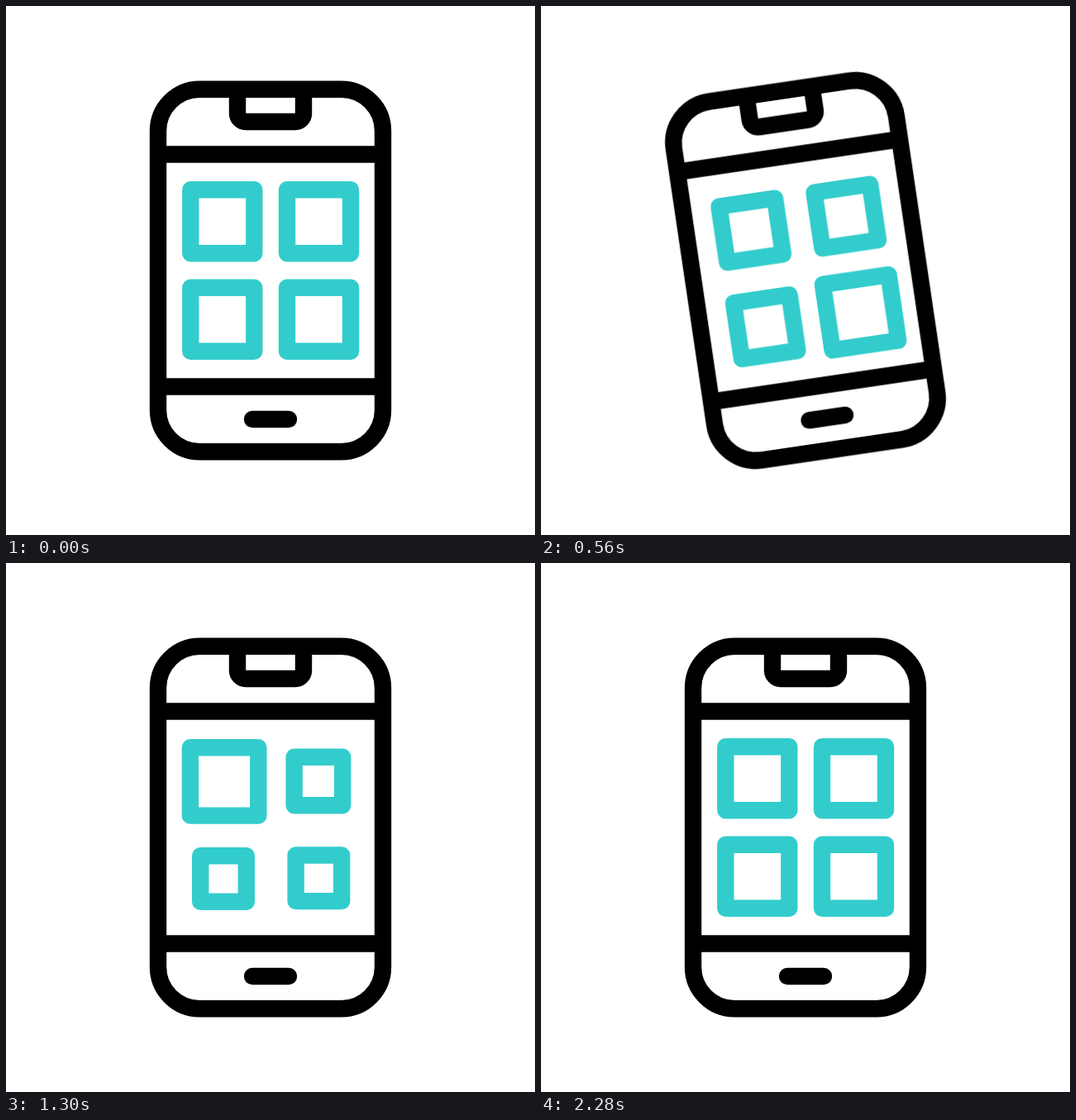
Recreate the animation shown at these times as an HTML page. Size 640x640 px, loop 2400 ms.

```html
<!DOCTYPE html>
<html lang="en">
<head>
<meta charset="utf-8">
<title>Phone apps</title>
<style>
html, body { margin: 0; width: 100%; height: 100%; overflow: hidden; background: #fff; }
svg { display: block; width: 100%; height: 100%; fill: none; stroke: #000; stroke-width: 20.4; }

#phone, .app, .marks path { animation: 2.4s linear infinite; }
#phone { transform-origin: 320px 320px; animation-name: shake; }

.app { stroke: #33cccc; stroke-linejoin: round; }
#tl { animation-name: tl; }
#tr { animation-name: tr; }
#bl { animation-name: bl; }
#br { animation-name: br; }

.marks { stroke: #33cccc; stroke-linecap: round; opacity: 0; animation: 2.4s step-end infinite; }
.marks path { stroke-dasharray: 0 100; }
#left { animation-name: showLeft; }
#left path { animation-name: drawLeft; }
#right { animation-name: showRight; }
#right path { animation-name: drawRight; }

@keyframes shake {
  0%, 3.333% { transform: rotate(0deg); }
  11.667% { transform: rotate(17deg); }
  20% { transform: rotate(-17deg); }
  26.667%, 100% { transform: rotate(0deg); }
}

/* Each app square moves between a rest, a small and a big pose. */
@keyframes tl {
  0%, 20%, 95%, 100% { x: 223.3px; y: 222.3px; width: 77px; height: 77px; }
  28.333%, 36.667%, 61.667%, 86.667% { x: 234.4px; y: 236.7px; width: 55.6px; height: 55.6px; }
  45%, 53.333% { x: 221.5px; y: 221.6px; width: 85.6px; height: 85.6px; }
}
@keyframes tr {
  0%, 20%, 95%, 100% { x: 340px; y: 222.3px; width: 77px; height: 77px; }
  28.333%, 53.333%, 78.333%, 86.667% { x: 350.2px; y: 236.6px; width: 55.6px; height: 55.6px; }
  61.667%, 70% { x: 335.3px; y: 218.5px; width: 84px; height: 84px; }
}
@keyframes bl {
  0%, 20%, 95%, 100% { x: 223.3px; y: 340.7px; width: 77px; height: 77px; }
  28.333%, 70% { x: 235.2px; y: 354.2px; width: 55.6px; height: 55.6px; }
  78.333%, 86.667% { x: 221.4px; y: 337.8px; width: 85.6px; height: 85.6px; }
}
@keyframes br {
  0%, 20%, 95%, 100% { x: 340px; y: 340.7px; width: 77px; height: 77px; }
  28.333%, 36.667% { x: 335.6px; y: 338.2px; width: 85.6px; height: 85.6px; }
  45%, 86.667% { x: 350.6px; y: 353.5px; width: 55.6px; height: 55.6px; }
}

/* Marks grow outwards, then their inner end follows. */
@keyframes drawLeft {
  0%, 31.46% { stroke-dasharray: 0 100; stroke-dashoffset: 0; }
  36.46% { stroke-dasharray: 42 100; stroke-dashoffset: 0; }
  41.46% { stroke-dasharray: 0 100; stroke-dashoffset: -42; }
  41.47%, 85% { stroke-dasharray: 0 100; stroke-dashoffset: 0; }
  90% { stroke-dasharray: 42 100; stroke-dashoffset: 0; }
  95%, 100% { stroke-dasharray: 0 100; stroke-dashoffset: -42; }
}
@keyframes drawRight {
  0%, 56.667% { stroke-dasharray: 0 100; stroke-dashoffset: 0; }
  61.667% { stroke-dasharray: 42 100; stroke-dashoffset: 0; }
  66.667%, 100% { stroke-dasharray: 0 100; stroke-dashoffset: -42; }
}
@keyframes showLeft {
  0%, 41.4%, 94.9%, 100% { opacity: 0; }
  31.5%, 85.1% { opacity: 1; }
}
@keyframes showRight {
  0%, 66.6%, 100% { opacity: 0; }
  56.75% { opacity: 1; }
}
</style>
</head>
<body>
<svg viewBox="0 0 640 640">
  <g id="phone">
    <rect x="184" y="100.7" width="272" height="438.6" rx="50.5"/>
    <path d="M184 179.5H456M184 460.5H456"/>
    <path d="M280 101V130a10 10 0 0 0 10 10H350a10 10 0 0 0 10-10V101"/>
    <path d="M298 500H342" stroke-linecap="round"/>
    <rect class="app" id="tl" x="223.3" y="222.3" width="77" height="77"/>
    <rect class="app" id="tr" x="340" y="222.3" width="77" height="77"/>
    <rect class="app" id="bl" x="223.3" y="340.7" width="77" height="77"/>
    <rect class="app" id="br" x="340" y="340.7" width="77" height="77"/>
  </g>
  <g class="marks" id="left">
    <path d="M133 295.3L98 272"/>
    <path d="M133 336.7L98 360"/>
  </g>
  <g class="marks" id="right">
    <path d="M502 295.3L537 272"/>
    <path d="M502 336.7L537 360"/>
  </g>
</svg>
</body>
</html>
```
